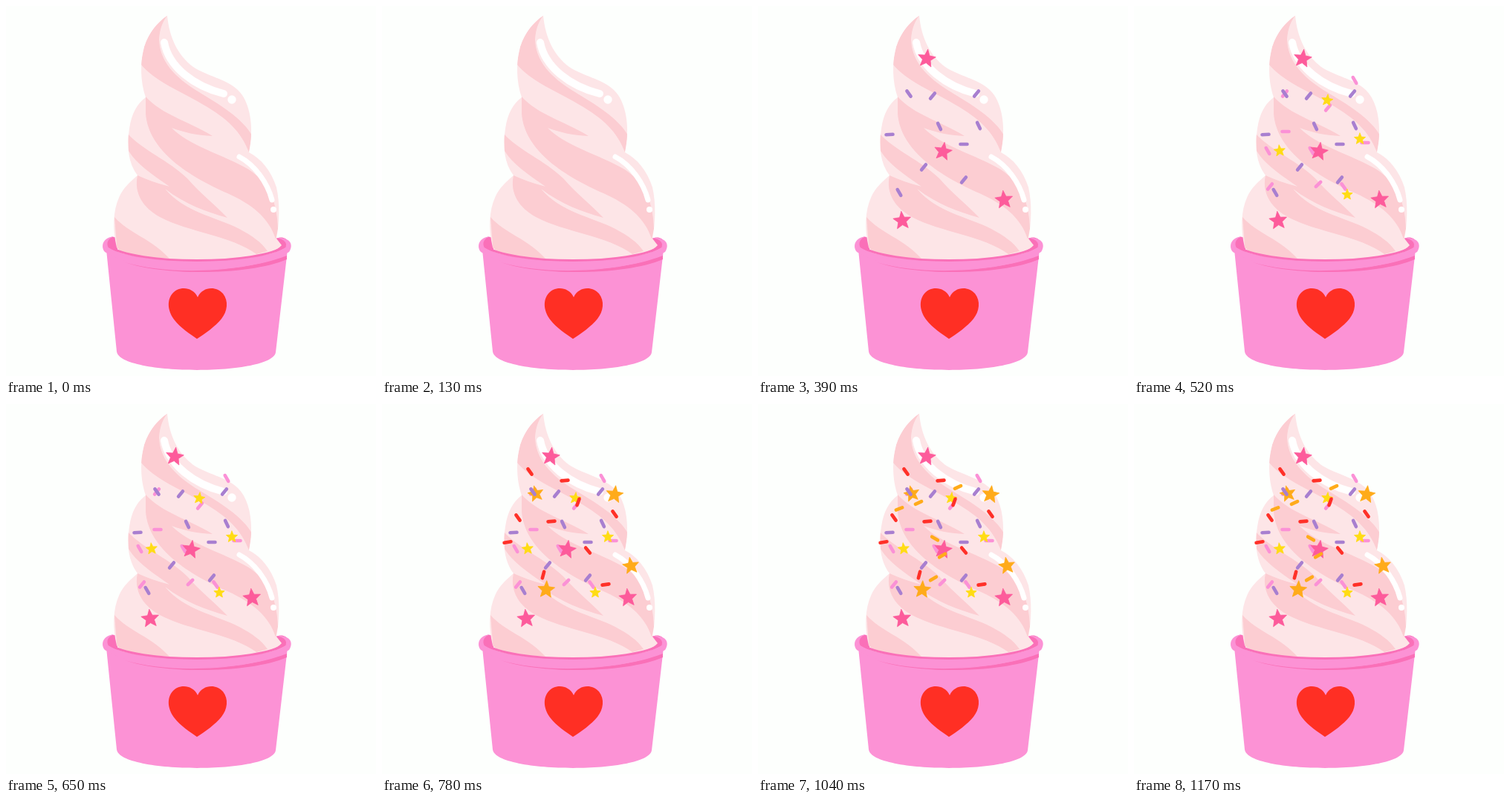
An HTML page for the animation above (1.3 s loop, 498 by 498 pixels).

```html
<!DOCTYPE html>
<html lang="en">
<head>
<meta charset="utf-8">
<title>Sprinkled soft serve</title>
<style>
html, body { margin: 0; width: 100%; height: 100%; overflow: hidden; background: #fdfffd; }
svg { display: block; width: 100vw; height: 100vh; }
.shade { fill: #fccdd2; }
.shine { fill: none; stroke: #fff; stroke-linecap: round; }
</style>
</head>
<body>
<svg viewBox="0 0 498 498">
  <defs>
    <path id="cream" d="M217 13C220 43 231 66 252 82C270 94 296 98 312 113C329 129 334 164 327 197C343 205 357 222 364 244C369 266 368 292 364 313L371 322C350 350 170 350 149 325C143 300 144 276 152 258C158 244 167 237 177 228C165 212 162 190 166 165C169 145 176 132 188 123C181 103 180 77 186 55C192 36 204 22 217 13Z"/>
    <clipPath id="inside"><use href="#cream"/></clipPath>
  </defs>

  <!-- back of the rim -->
  <path fill="#fa70b8" d="M134 318C137 311 143 310 150 312L150 332L134 324ZM380 318C377 311 371 310 362 313L362 332L380 324Z"/>

  <use href="#cream" fill="#fde5e7"/>
  <g class="shade" clip-path="url(#inside)">
    <path d="M217 13C206 19 193 33 186 55L181 78C201 102 236 115 264 132C298 151 317 170 327 197L331 174C318 151 288 133 260 116C225 95 207 73 206 45C207 30 211 21 217 13Z"/>
    <path d="M188 122C209 146 246 155 278 175C256 174 239 170 223 164C246 188 294 201 325 219C352 236 365 261 366 300L363 314C354 284 329 266 298 252C248 230 192 196 188 145Z"/>
    <path d="M164 172C185 195 218 207 244 232C262 253 280 266 298 285C270 277 241 267 214 246C239 277 283 284 314 300C331 309 344 318 352 330L337 334C303 309 247 305 207 284C184 271 172 252 177 228C190 234 204 239 220 243C197 227 175 212 165 195Z"/>
    <path d="M146 284C165 306 196 313 220 340L150 334Z"/>
  </g>
  <g class="shine">
    <path stroke-width="10" d="M213 49C219 82 253 108 293 118"/>
    <path stroke-width="7" d="M314 203C335 214 352 238 358 261"/>
  </g>
  <circle cx="304" cy="126" r="5.7" fill="#fff"/>
  <circle cx="360" cy="274" r="4" fill="#fff"/>

  <!-- cup -->
  <path fill="#fc92d5" d="M135 328L149 465C153 498 359 498 363 466L379 328C340 352 174 352 135 328Z"/>
  <path fill="#fa70b8" d="M160 345C215 362 315 360 378 336L378 341C330 362 215 364 160 345Z"/>
  <path fill="#fc92d5" d="M146 310C130 311 127 324 133 331C160 348 204 355 257 355C312 355 356 346 381 331C387 322 384 311 364 312C376 314 379 320 376 325C340 349 174 349 138 325C134 319 138 312 146 310Z"/>
  <path fill="none" stroke="#fa70b8" stroke-width="3" d="M138 323C174 349 340 349 376 323"/>
  <path fill="#ff2f24" d="M258 392C251 377 232 377 224 387C215 398 219 413 227 423C235 433 247 441 257 448C268 441 282 431 290 421C298 411 300 397 292 387C283 377 265 377 258 392Z"/>

  <g id="toppings"></g>
</svg>
<script>
const BEAT = 260, BEATS = 5;
const root = document.getElementById("toppings");

function layer(from, color, shape, items) {
  const path = document.createElementNS("http://www.w3.org/2000/svg", "path");
  path.setAttribute("d", items.map(item => shape(...item)).join(""));
  path.setAttribute("fill", color);
  path.setAttribute("stroke", color);
  path.setAttribute("stroke-width", shape === sprinkle ? 4.6 : 0.8);
  path.setAttribute("stroke-linecap", "round");
  path.setAttribute("stroke-linejoin", "round");
  root.append(path);
  return { path, from };
}

function star(x, y, r, turn) {
  const points = Array.from({ length: 10 }, (_, i) => {
    const a = (i * 36 - 90 + turn) * Math.PI / 180;
    const d = i % 2 ? r * 0.45 : r;
    return `${x + d * Math.cos(a)} ${y + d * Math.sin(a)}`;
  });
  return `M${points.join("L")}Z`;
}

function sprinkle(x, y, angle) {
  const a = angle * Math.PI / 180;
  const dx = 4.5 * Math.cos(a), dy = 4.5 * Math.sin(a);
  return `M${x - dx} ${y - dy}L${x + dx} ${y + dy}`;
}

// Listed from back to front; the second beat shows the first toppings.
const layers = [
  layer(2, "#fb91d6", sprinkle, [
    [297, 100, 60], [203, 118, -50], [261, 137, -50], [204, 169, 0], [311, 184, 0],
    [180, 195, 60], [239, 195, 60], [248, 240, -45], [282, 243, 55], [183, 243, -50]]),
  layer(3, "#ffab1a", star, [[207, 121, 11, -12], [313, 122, 12, 8], [335, 218, 11.5, -8], [221, 250, 12, 4]]),
  layer(2, "#ffdc14", star, [[260, 127, 8, 8], [304, 179, 8, 0], [196, 195, 8, -5], [287, 254, 7.5, 0]]),
  layer(1, "#fd5b9b", star, [[227, 71, 12.5, 8], [249, 196, 12.5, 10], [331, 261, 12.5, -5], [194, 289, 12.5, -5]]),
  layer(1, "#a87fd0", sprinkle, [
    [203, 118, 55], [235, 121, -50], [294, 118, -50], [244, 162, 65], [297, 161, 65],
    [177, 173, -3], [277, 186, 0], [223, 217, -50], [277, 234, -50], [190, 251, 60]]),
  layer(3, "#ff3028", sprinkle, [
    [199, 91, 55], [246, 103, -5], [264, 132, -70], [313, 148, 55], [183, 153, 55],
    [228, 158, -5], [169, 186, -10], [277, 197, 50], [217, 230, -75], [301, 243, -8]]),
  layer(4, "#ffab1a", sprinkle, [
    [269, 112, -25], [216, 133, -25], [190, 141, -20], [238, 181, 30], [248, 204, -30], [236, 235, -30]])
];

const start = performance.now();
function draw() {
  const beat = Math.floor((performance.now() - start) / BEAT) % BEATS;
  for (const { path, from } of layers) path.style.display = beat >= from ? "" : "none";
  requestAnimationFrame(draw);
}
draw();
</script>
</body>
</html>
```
